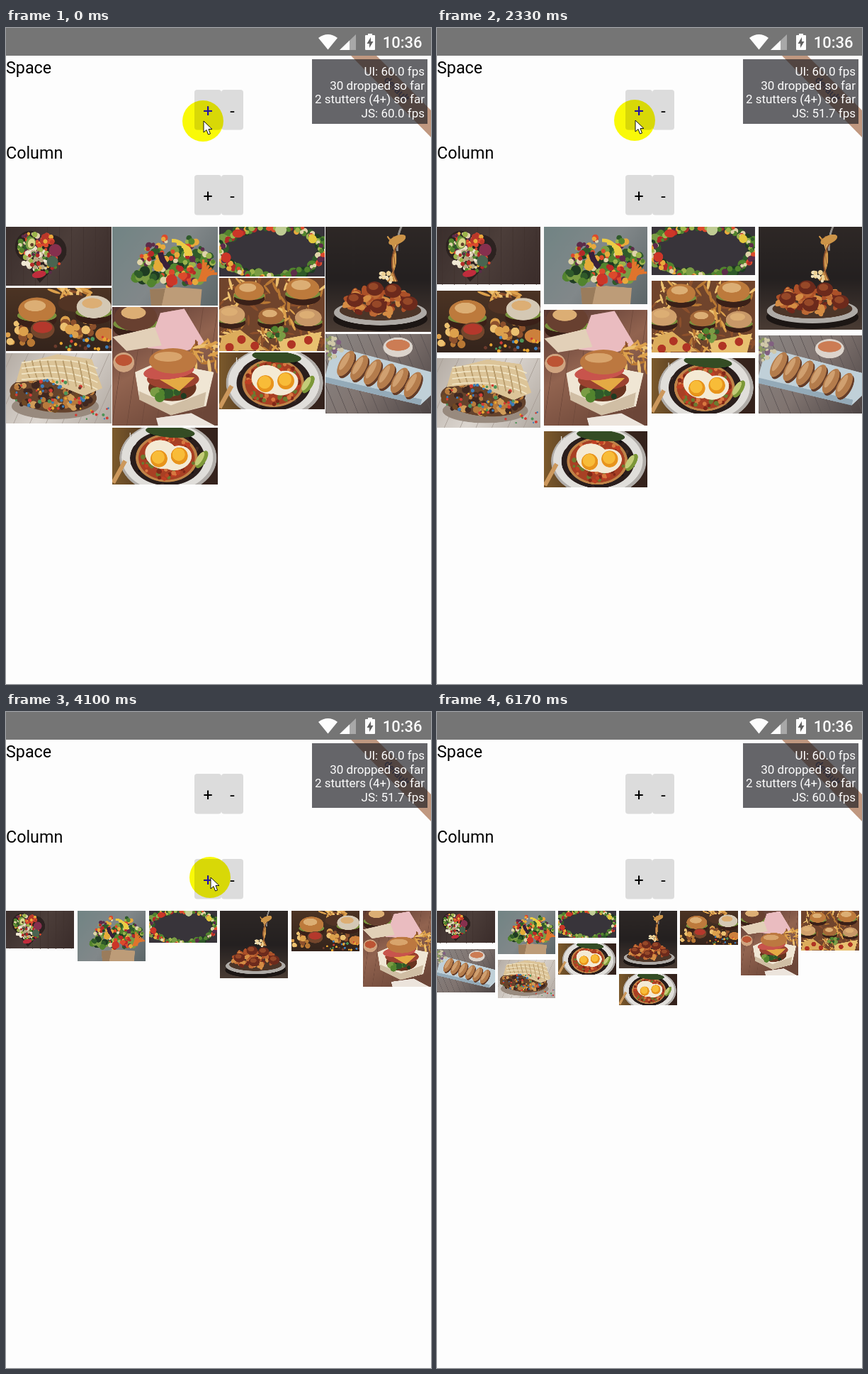
Animation of 600x924 px, one loop 7.06 s. Source, as an HTML page with a canvas:

```html
<!DOCTYPE html>
<html lang="en">
<head>
<meta charset="utf-8">
<title>Masonry grid</title>
<style>
html, body { margin: 0; width: 100%; height: 100%; overflow: hidden; background: #fdfdfd; }
canvas { display: block; width: 600px; height: 924px; }
</style>
</head>
<body>
<canvas id="stage" width="600" height="924"></canvas>
<script>
const LOOP = 7060, TOP = 279.5, PAPER = '#fdfdfd';
const ctx = document.getElementById('stage').getContext('2d');
let pen = ctx;
let seed = 7;

const random = () => (seed = (seed * 16807) % 2147483647) / 2147483647;
const clamp = v => Math.max(0, Math.min(1, v));
const progress = (t, start, end) => clamp((t - start) / (end - start));

// Drawing helpers
function rect(color, x, y, w, h, r = 0) {
  pen.fillStyle = color;
  pen.beginPath();
  pen.roundRect(x, y, w, h, r);
  pen.fill();
}
function oval(color, x, y, rx, ry = rx, turn = 0) {
  pen.fillStyle = color;
  pen.beginPath();
  pen.ellipse(x, y, rx, ry, turn, 0, 7);
  pen.fill();
}
function poly(color, ...points) {
  pen.fillStyle = color;
  pen.beginPath();
  for (let i = 0; i < points.length; i += 2) pen.lineTo(points[i], points[i + 1]);
  pen.fill();
}
function curve(color, width, x1, y1, cx, cy, x2, y2) {
  pen.strokeStyle = color;
  pen.lineWidth = width;
  pen.beginPath();
  pen.moveTo(x1, y1);
  pen.quadraticCurveTo(cx, cy, x2, y2);
  pen.stroke();
}
function shade(x1, y1, x2, y2, ...colors) {
  const fill = pen.createLinearGradient(x1, y1, x2, y2);
  colors.forEach((c, i) => fill.addColorStop(i / (colors.length - 1), c));
  return fill;
}
function text(str, x, y, size, color, align = 'left', weight = 400) {
  pen.font = `${weight} ${size}px Roboto, sans-serif`;
  pen.textAlign = align;
  pen.fillStyle = color;
  pen.fillText(str, x, y);
}

const inBox = (x, y, w, h) => () => [x + random() * w, y + random() * h];
const inOval = (x, y, rx, ry) => () => {
  const a = random() * 6.283, d = Math.sqrt(random());
  return [x + rx * d * Math.cos(a), y + ry * d * Math.sin(a)];
};
function scatter(colors, count, size, place, stretch = 1) {
  for (let i = 0; i < count; i++) {
    const [x, y] = place();
    const r = size * (0.6 + random() * 0.6);
    oval(colors[Math.floor(random() * colors.length)], x, y, r * stretch, r, random() * 3.1);
  }
}
function planks(color, gap, slant) {
  for (let x = -60; x < 230; x += gap) curve(color, 0.8, x, 0, x + slant / 2, 85, x + slant, 170);
}

const VEG = ['#b32a28', '#dc4a2c', '#e8a93c', '#52842e', '#2f5a2a', '#9cb44c', '#dfd3a8', '#5c2c4a'];
const GREENS = ['#2f5a2a', '#52842e', '#7a9c44', '#1f3c22'];
const FRIES = ['#dca04c', '#b87834', '#ecc070', '#8c502c'];
const CREAM = ['#e6dcc4', '#cdbd9c', '#f0e8d4', '#b9a884'];
const CANDY = ['#d23c34', '#e8a632', '#4d9458', '#3c7cb8', '#6c3b2c'];

function burger(x, y, r, bun = '#bd7a3c') {
  oval('#3a2018', x, y + r * 0.5, r, r * 0.45);
  oval('#78903c', x, y + r * 0.3, r, r * 0.3);
  oval(bun, x, y, r * 0.95, r * 0.62);
  oval('#dcae74', x - r * 0.1, y - r * 0.2, r * 0.55, r * 0.28);
}

// Every picture is painted 150 units wide
function heartBowl() {
  rect(shade(0, 0, 150, 84, '#3a2e2c', '#4c3e3a', '#3a2c2a'), 0, 0, 150, 84);
  planks('#40332f', 17, 0);
  oval('#2c2220', 33, 28, 20, 22, 0.3);
  oval('#2c2220', 64, 34, 22, 22);
  poly('#2c2220', 14, 34, 86, 40, 48, 80);
  scatter(VEG, 50, 3.5, inOval(34, 27, 16, 18));
  scatter(CREAM, 50, 3.5, inOval(42, 46, 20, 15));
  scatter(VEG, 40, 3, inOval(54, 50, 24, 18));
  scatter(['#dc4a2c', '#e8a93c', '#b9372a'], 14, 4, inOval(58, 20, 9, 8));
  oval('#7a9c44', 35, 24, 7, 9, 0.3);
  oval('#dcd88c', 36, 24, 5, 7, 0.3);
  oval('#60402a', 37, 26, 2.5);
  oval('#86304e', 70, 34, 9);
  oval('#4a6450', 66, 50, 8);
  oval('#c02c3c', 47, 68, 10, 5, -0.2);
}
function groceryBag() {
  rect(shade(0, 0, 150, 112, '#718484', '#82888a', '#5c6668'), 0, 0, 150, 112);
  scatter(GREENS, 50, 7, inOval(88, 60, 53, 30));
  scatter(VEG, 110, 4.2, inOval(90, 50, 53, 36));
  scatter(['#bc2b28', '#dc4a2c'], 12, 4, inOval(104, 66, 14, 9));
  scatter(GREENS, 18, 6, inOval(46, 72, 16, 10));
  for (let i = 0; i < 6; i++) curve('#e0742c', 3.5, 122 + i * 2, 78, 130, 66, 129 + i * 4, 47 + i * 4);
  for (let i = 0; i < 3; i++) curve('#ebcc44', 5, 84 + i * 7, 20 + i * 4, 104 + i * 4, 20 + i * 4, 105 + i * 3, 42);
  curve('#38203a', 8, 68, 37, 70, 50, 80, 59);
  oval('#e4ac38', 65, 57, 7);
  oval('#cc3628', 84, 76, 8);
  poly('#bd9c78', 53, 89, 90, 86, 127, 89, 125, 112, 55, 112);
  poly('#9a7c5c', 53, 89, 75, 88, 70, 112, 55, 112);
}
function vegetableFrame() {
  rect('#38343a', 0, 0, 150, 71);
  const edge = () => {
    const a = random() * 6.283;
    return [75 + Math.cos(a) * (66 + random() * 14), 35 + Math.sin(a) * (31 + random() * 10)];
  };
  scatter(GREENS, 70, 6.5, edge);
  scatter(VEG, 140, 4, edge);
  oval('#cc3628', 27, 10, 8, 6);
  oval('#cc3628', 10, 44, 7);
  oval('#e4c83c', 133, 18, 6);
  oval('#c0cc94', 88, 5, 8);
}
function spaghetti() {
  rect(shade(0, 0, 0, 150, '#2e2826', '#242020', '#4a3c34'), 0, 0, 150, 150);
  oval('#1c1614', 78, 131, 67, 17);
  oval('#aeaaa6', 78, 122, 66, 18);
  oval('#4c3528', 78, 119, 58, 14);
  curve('#94908c', 3, 108, 0, 101, 15, 102, 35);
  for (let i = 0; i < 8; i++) curve(FRIES[i % 4], 2, 88 + i * 3, 14 + i % 3 * 3, 112 - i * 4, 45, 88 + i * 2, 78);
  oval('#cc9448', 102, 19, 13, 6, -0.4);
  scatter(['#ac5028', '#d48c44', '#70281c', '#bc6834'], 110, 4, inOval(76, 106, 50, 19), 1.6);
  for (const [x, y] of [[42, 104], [70, 88], [96, 91], [119, 109], [75, 113]]) {
    oval('#6c2a1c', x, y, 12, 10);
    oval('#964828', x - 2, y - 3, 7, 5);
  }
  scatter(['#ecd094', '#f0e2bc'], 12, 3, inOval(85, 73, 11, 8));
}
function burgerTable() {
  rect(shade(0, 0, 0, 90, '#4c3424', '#34241c'), 0, 0, 150, 90);
  scatter(FRIES, 24, 2, inBox(68, 0, 50, 16), 5);
  oval('#523424', 98, 22, 24, 12);
  scatter(FRIES, 16, 6, inBox(0, 48, 36, 32));
  scatter(FRIES, 16, 6, inOval(103, 55, 25, 15));
  burger(44, 31, 28);
  burger(125, 27, 26, '#d4c8b4');
  oval('#74462c', 52, 59, 17, 13);
  oval('#b4382c', 52, 56, 14, 8);
  oval('#cc803c', 141, 66, 14, 10);
  scatter(CANDY, 26, 2.5, inBox(70, 68, 78, 20));
}
function burgerBox() {
  rect(shade(0, 0, 100, 168, '#543430', '#926450', '#6c4638'), 0, 0, 150, 168);
  planks('#704a3c', 21, -25);
  burger(33, 14, 32, '#684030');
  poly('#eabcc0', 68, 8, 102, 2, 132, 52, 104, 62, 50, 58);
  poly('#e2d0b8', 0, 42, 60, 28, 70, 54, 20, 62);
  oval('#d0a480', 16, 78, 15, 14);
  oval('#bc5434', 16, 75, 12, 8);
  scatter(FRIES, 32, 2, inBox(108, 52, 42, 38), 5);
  poly('#f0e6d4', 32, 92, 66, 77, 144, 92, 133, 140, 83, 153, 38, 129);
  poly('#d0bea4', 38, 119, 83, 139, 133, 120, 130, 140, 83, 153, 38, 131);
  oval('#683420', 85, 114, 34, 19);
  scatter(GREENS, 16, 6, inOval(80, 124, 28, 6));
  oval('#9c4230', 86, 102, 37, 14);
  poly('#e4aa44', 63, 100, 117, 99, 95, 119);
  oval('#c8544c', 80, 91, 36, 11, -0.1);
  oval('#bc7840', 86, 76, 34, 18);
  oval('#d8a46c', 79, 70, 20, 7);
  poly('#ece4dc', 62, 157, 112, 150, 146, 168, 65, 168);
}
function fastFood() {
  rect('#70442c', 0, 0, 150, 103);
  scatter(FRIES, 150, 1.9, inBox(0, 0, 150, 103), 4.5);
  burger(43, 18, 22);
  burger(119, 15, 25);
  burger(17, 52, 21, '#d0a06c');
  burger(127, 56, 20, '#c89868');
  burger(74, 54, 19, '#a46838');
  poly('#dcac5c', 4, 82, 30, 73, 67, 102, 0, 103);
  poly('#e8c070', 84, 88, 146, 76, 139, 103, 88, 103);
  for (const [x, y] of [[32, 87], [51, 96], [15, 98], [103, 94], [127, 88]]) oval('#b03424', x, y, 6);
  scatter(GREENS, 13, 4, inOval(85, 78, 14, 8));
}
function springRolls() {
  rect(shade(0, 0, 150, 112, '#8a8684', '#807470', '#4c4444'), 0, 0, 150, 113);
  planks('#5c5454', 15, 70);
  poly('#c0d0d8', 9, 25, 24, 21, 150, 54, 150, 87, 135, 101, 0, 69, 0, 58);
  poly('#94aab8', 0, 61, 137, 93, 135, 101, 0, 69);
  for (let i = 0; i < 6; i++) {
    const x = 29 + i * 19, y = 42 + i * 6;
    oval('#643c28', x + 2, y + 3, 20, 9, -1.05);
    oval('#b47c4c', x, y, 20, 9, -1.05);
    oval('#d0a070', x - 2, y - 3, 14, 4, -1.05);
  }
  oval('#dcd4cc', 103, 19, 21, 14);
  oval('#cc7c54', 103, 16, 17, 8);
  scatter(['#8c9b60', '#816080', '#d0c8a8'], 26, 3, inOval(10, 20, 13, 17));
}
function waffle() {
  rect(shade(0, 0, 150, 100, '#b4aca4', '#dcd6d0', '#b0a8a0'), 0, 0, 150, 101);
  planks('#a89e96', 23, -75);
  oval('#988a7e', 70, 76, 62, 18);
  oval('#64422c', 67, 59, 62, 25, 0.1);
  scatter(['#704824', '#b87a3c', '#402820', '#d09c58'], 85, 4.5, inOval(67, 58, 60, 23));
  poly('#dcc498', 22, 15, 73, 2, 122, 9, 137, 50, 111, 61, 54, 38, 14, 42);
  for (let i = 0; i < 9; i++) {
    curve('#b89c6c', 1.8, 26 + i * 11, 11, 30 + i * 11, 28, 34 + i * 11, 36 + i * 2);
    if (i < 4) curve('#f0e4c4', 1.8, 22, 14 + i * 8, 90, 3 + i * 9, 130, 22 + i * 10);
  }
  scatter(CANDY, 60, 2.3, inOval(65, 59, 57, 21));
  scatter(CANDY, 12, 1.8, inBox(80, 74, 66, 23));
}
function friedEggs() {
  rect(shade(0, 0, 150, 0, '#7c5a2c', '#3c281c', '#34221c'), 0, 0, 150, 81);
  oval('#b0aca8', 79, 43, 69, 51);
  oval('#e0deda', 78, 42, 65, 48);
  oval('#2a1e1c', 78, 43, 53, 39);
  scatter(['#151012', '#402c28', '#281e1e'], 80, 2.5, inOval(78, 43, 52, 38));
  oval('#c08448', 77, 43, 44, 34);
  oval('#a84024', 77, 43, 40, 31);
  scatter(['#c04024', '#d87840', '#802818', '#6d7a30'], 100, 3, inOval(77, 43, 39, 30));
  oval('#f4ead4', 70, 38, 24, 20, 0.3);
  oval('#f4ead4', 91, 43, 22, 17, -0.3);
  for (const [x, y] of [[66, 44], [95, 40]]) {
    oval('#e8941c', x, y, 12);
    oval('#f8bc38', x - 1, y - 2, 9);
  }
  oval('#344c24', 82, 6, 35, 8, 0.08);
  oval('#7c9838', 127, 45, 6, 14, 0.55);
  oval('#c4cc78', 124, 44, 4, 11, 0.55);
  curve('#cc985c', 6, 1, 78, 8, 65, 18, 47);
  curve('#e0deda', 3, 18, 47, 24, 38, 29, 18);
  for (let i = 0; i < 4; i++) curve('#e0deda', 1.2, 25, 29, 25 + i * 3, 25, 25 + i * 4, 7 + i * 2);
}

const photos = [
  [heartBowl, 0.563], [groceryBag, 0.747], [vegetableFrame, 0.47], [spaghetti, 0.998],
  [burgerTable, 0.597], [burgerBox, 1.12], [fastFood, 0.688], [springRolls, 0.75],
  [waffle, 0.67], [friedEggs, 0.538], [friedEggs, 0.538]
].map(([paint, ratio]) => {
  const image = document.createElement('canvas');
  image.width = 300;
  image.height = Math.round(300 * ratio);
  pen = image.getContext('2d');
  pen.scale(2, 2);
  paint();
  return { image, ratio };
});
pen = ctx;

// Photos go to the columns in turn
function grid(columns, space, spread, alphaOf) {
  const width = 600 / columns - space;
  const step = spread ? (600 - width) / (columns - 1) : 600 / columns;
  const bottoms = Array(columns).fill(TOP);
  photos.forEach(({ image, ratio }, i) => {
    const column = i % columns, height = width * ratio;
    ctx.globalAlpha = alphaOf(i);
    ctx.drawImage(image, column * step, bottoms[column], width, height);
    bottoms[column] += height + 2 * space + (space === 1 ? 0.6 : 0);
  });
  ctx.globalAlpha = 1;
}

function drawGallery(t) {
  if (t < 2770) {
    const [from, to, mix] = t < 1800 ? [1, 2, progress(t, 1230, 1570)]
      : t < 2000 ? [2, 3, progress(t, 1800, 1980)]
      : [3, 4, progress(t, 2000, 2300)];
    if (mix < 1) grid(4, from, true, () => 1 - mix);
    if (mix > 0) grid(4, to, true, () => mix);
  } else if (t < 3730) {
    grid(5, 4, t < 3270, i => i < 5 ? progress(t, 2790, 3090) : progress(t, 3270, 3570));
  } else if (t < 4570) {
    grid(6, 4, t < 4130, i => i < 6 ? progress(t, 3800, 4100) : progress(t, 4130, 4430));
  } else {
    grid(7, 4, t < 5300, i => i < 1 ? progress(t, 4570, 4870)
      : i < 8 ? progress(t, 4930, 5200) : progress(t, 5300, 5430));
  }
}

function pointerAt(t) {
  const moves = [
    [30, 100, 1, -1], [2370, 2700, 7, 104], [3230, 3330, 2, -1], [5570, 5930, 18, 740]
  ];
  let x = 278, y = 131;
  for (const [start, end, dx, dy] of moves) {
    const p = progress(t, start, end), eased = p * p * (3 - 2 * p);
    x += dx * eased;
    y += dy * eased;
  }
  return [x, y];
}

function drawPointer(x, y) {
  ctx.globalCompositeOperation = 'multiply';
  oval('#fbfb08', x, y, 29);
  ctx.globalCompositeOperation = 'source-over';
  // The highlight tints the label beneath it
  ctx.save();
  ctx.beginPath();
  ctx.arc(x, y, 29, 0, 7);
  ctx.clip();
  for (const top of [87, 207]) text('+', 285, top + 38, 23.3, '#2412a8', 'center');
  ctx.restore();
  ctx.save();
  ctx.translate(x + 1, y);
  ctx.beginPath();
  for (const [px, py] of [[0, 0], [0, 16], [4, 12.5], [6.5, 19], [9.5, 18], [7, 11.5], [12, 11.5]]) ctx.lineTo(px, py);
  ctx.closePath();
  ctx.fillStyle = '#fff';
  ctx.strokeStyle = '#111';
  ctx.lineWidth = 1;
  ctx.fill();
  ctx.stroke();
  ctx.restore();
}

function drawStatusBar() {
  rect('#757575', 0, 0, 600, 39);
  ctx.fillStyle = PAPER;
  ctx.beginPath();
  ctx.moveTo(454.5, 30.5);
  ctx.lineTo(441, 14);
  ctx.quadraticCurveTo(454.5, 4, 468, 14);
  ctx.fill();
  poly('#a8a8a8', 471, 31, 494, 31, 494, 9);
  poly(PAPER, 471, 31, 485, 31, 485, 17.5);
  rect(PAPER, 511, 8, 6, 4);
  rect(PAPER, 507, 10, 14, 21, 1);
  poly('#606060', 515, 13, 509.5, 22, 513, 22, 513, 28, 518.5, 19, 515, 19);
  text('10:36', 587.5, 28, 22, PAPER, 'right', 500);
}

function drawMonitor(t) {
  poly('#c09880', 487, 39, 523, 39, 600, 116, 600, 154);
  ctx.save();
  ctx.translate(552, 86);
  ctx.rotate(Math.PI / 4);
  text('default', 0, 5, 14, '#55506a', 'center', 500);
  ctx.restore();
  rect('rgba(30,30,36,.68)', 432, 44, 163, 91);
  const rate = t < 1300 ? '60.0' : t < 2100 ? '49.7' : t < 4750 ? '51.7'
    : t < 5800 ? '55.9' : t < 6120 ? '58.0' : '60.0';
  ['UI: 60.0 fps', '30 dropped so far', '2 stutters (4+) so far', `JS: ${rate} fps`]
    .forEach((line, i) => text(line, 591, 67 + i * 19.6, 17, PAPER, 'right'));
}

function drawControls(label, baseline, top) {
  text(label, 0, baseline, 23.3, '#000');
  rect('#dcdcdc', 266, top, 38, 56.5, 4);
  rect('#dcdcdc', 304, top, 31, 56.5, 4);
  text('+', 285, top + 38, 23.3, '#000', 'center');
  text('-', 319.5, top + 38, 23.3, '#000', 'center');
}

function frame(now) {
  const t = now % LOOP;
  rect(PAPER, 0, 0, 600, 924);
  drawStatusBar();
  drawControls('Space', 64, 87);
  drawControls('Column', 184, 207);
  drawGallery(t);
  drawMonitor(t);
  const [x, y] = pointerAt(t);
  if (y < 955) drawPointer(x, y);
  requestAnimationFrame(frame);
}
requestAnimationFrame(frame);
</script>
</body>
</html>
```
